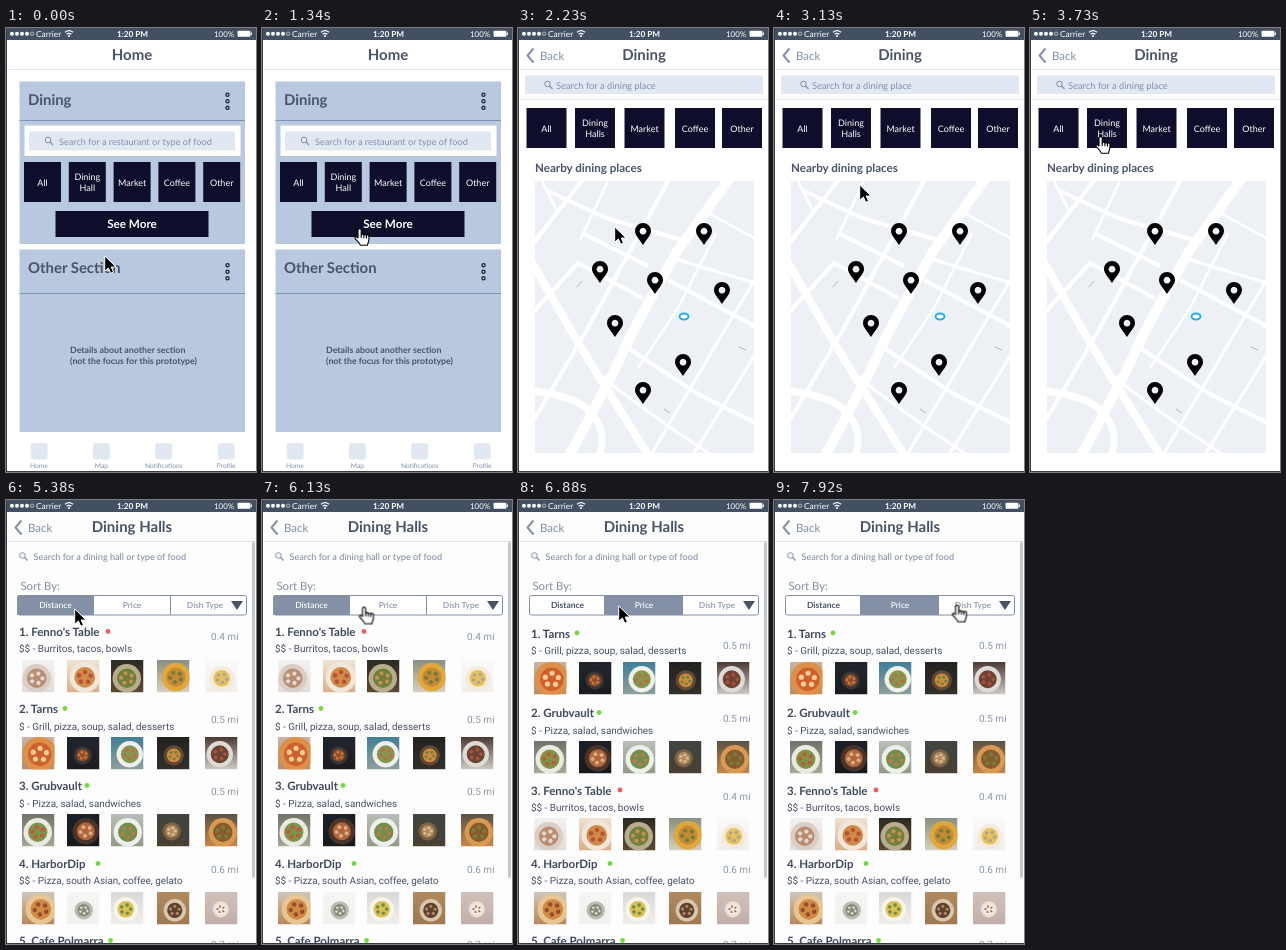
Recreate the animation shown at these times as an HTML page. Size 250 px wide and 444 px high, loop 8 s.

```html
<!DOCTYPE html>
<html lang="en">
<head>
<meta charset="utf-8">
<title>Dining app prototype</title>
<style>
html, body { margin: 0; width: 100%; height: 100%; overflow: hidden; background: #fff; }
svg { display: block; }
text { font-family: Lato, sans-serif; text-rendering: geometricPrecision; white-space: pre; }
.rb { font-family: Roboto, sans-serif; }
.md { font-weight: 500; }
.b { font-weight: 700; }
.m { text-anchor: middle; }
#home, #map, #near, #price, #cursor, #arrow, #hand { animation: 8s step-end infinite; }
#home { animation-name: home; }
#map { animation-name: map; }
#near { animation-name: near; }
#price { animation-name: price; }
#cursor { animation-name: move; }
#arrow { animation-name: arrow; }
#hand { animation-name: hand; }
@keyframes home { 0% { visibility: visible } 27.875%, 100% { visibility: hidden } }
@keyframes map { 0% { visibility: hidden } 27.875% { visibility: visible } 56%, 100% { visibility: hidden } }
@keyframes near { 0% { visibility: hidden } 56% { visibility: visible } 86%, 100% { visibility: hidden } }
@keyframes price { 0% { visibility: hidden } 86%, 100% { visibility: visible } }
@keyframes arrow {
  0%, 27.875%, 56%, 86% { visibility: visible }
  14.875%, 44.75%, 74.75%, 97.125%, 100% { visibility: hidden }
}
@keyframes hand {
  0%, 27.875%, 56%, 86% { visibility: hidden }
  14.875%, 44.75%, 74.75%, 97.125%, 100% { visibility: visible }
}
@keyframes move {
  0% { transform: translate(98px, 227px) }
  1.875% { transform: translate(97px, 226px) }
  13.125% { transform: translate(97px, 221px) }
  14.875% { transform: translate(92px, 204px) }
  16.75% { transform: translate(92px, 200px) }
  27.875% { transform: translate(96px, 198px) }
  37.25% { transform: translate(89px, 188px) }
  39.125% { transform: translate(85px, 156px) }
  41% { transform: translate(81px, 136px) }
  42.875% { transform: translate(72px, 120px) }
  44.75% { transform: translate(66px, 115px) }
  46.625% { transform: translate(65px, 108px) }
  56% { transform: translate(69px, 106px) }
  67.25% { transform: translate(68px, 108px) }
  69.125% { transform: translate(76px, 112px) }
  74.75% { transform: translate(92.5px, 107.5px) }
  76.625% { transform: translate(96.5px, 106.5px) }
  86% { transform: translate(100px, 105px) }
  93.5% { transform: translate(118px, 105px) }
  95.25% { transform: translate(155px, 102px) }
  97.125% { transform: translate(176.5px, 104.5px) }
  99%, 100% { transform: translate(177.5px, 104.5px) }
}
</style>
</head>
<body>
<svg width="250" height="444" viewBox="0 0 250 444">
  <rect width="250" height="444" fill="#fff"/>
  <g id="home"></g>
  <g id="map"></g>
  <g id="near"></g>
  <g id="price"></g>
  <g id="status"></g>
  <g id="cursor">
    <path id="arrow" d="M.7 .9V16.2L4.4 13 6.8 18.3 9.5 17.1 7.2 12H12z" fill="#000" stroke="#fff" stroke-width="1" stroke-linejoin="round"/>
    <g id="hand" stroke="#000" stroke-width="1.1" stroke-linejoin="round" stroke-linecap="round">
      <path fill="#fff" d="M4 10V2.2a1.6 1.6 0 0 1 3.2 0V7a1.4 1.4 0 0 1 2.7 .3 1.4 1.4 0 0 1 2.5 .5 1.3 1.3 0 0 1 2.5 .8v3.2c0 2-1.2 2.8-1.4 5.4H6.2C5.8 15 3 13 1.2 10.6 .4 9.2 2 8.3 3 9.2z"/>
      <path fill="none" d="M7.2 7V9.5M9.9 7.5V9.8M12.4 8V10"/>
    </g>
  </g>
</svg>
<script>
const SLATE = '#4a5468', BLUE = '#b8c8de', PALE = '#e1e8f2', NAVY = '#0e0e2c', STEEL = '#8090ad', GREY = '#8390a5';

const put = (id, parts) => { document.getElementById(id).innerHTML = parts.flat(9).join(''); };
const text = (x, y, size, str, fill, cls = '') =>
  `<text x="${x}" y="${y}" font-size="${size}" fill="${fill}" class="${cls}">${str}</text>`;
const rect = (x, y, w, h, fill, extra = '') =>
  `<rect x="${x}" y="${y}" width="${w}" height="${h}" fill="${fill}" ${extra}/>`;
const circle = (x, y, r, fill, extra = '') =>
  `<circle cx="${x}" cy="${y}" r="${r}" fill="${fill}" ${extra}/>`;
const path = (d, stroke, width, fill = 'none') =>
  `<path d="${d}" fill="${fill}" stroke="${stroke}" stroke-width="${width}"/>`;

const lens = (x, y) => circle(x, y, 2.8, 'none', `stroke="${STEEL}"`) +
  path(`M${x + 2} ${y + 2}l3 3`, STEEL, 1.3);
const title = str => text(126, 32.4, 15, str, SLATE, 'b m') + rect(1, 41, 249, 1, '#e2e6ec');
const back = color => path('M15.5 20.5L9.5 27.5 15.5 34.5', color, 2) + text(22, 31.5, 11.5, 'Back', color);

function button(cx, y, w, h, label) {
  const lines = label.split(' ');
  const top = y + h / 2 + (lines.length > 1 ? -2.5 : 3.5);
  return rect(cx - w / 2, y, w, h, NAVY) +
    lines.map((s, i) => text(cx, top + i * 11, 9, s, '#fff', 'm')).join('');
}

/* status bar and window edge */
put('status', [
  rect(0, 0, 250, 12, '#435063'),
  [6, 11, 16, 21].map(x => circle(x, 5.7, 2, '#fff')),
  circle(26, 5.7, 1.7, 'none', 'stroke="#fff" stroke-width=".6"'),
  text(30, 8.6, 8.4, 'Carrier', '#fff'),
  path('M59 4.3Q63 1.1 67 4.3M60.6 6.3Q63 4.3 65.4 6.3', '#fff', 1.2),
  circle(63, 8.1, 1, '#fff'),
  text(126.5, 8.6, 8.2, '1:20 PM', '#fff', 'b m'),
  text(208, 8.6, 7.9, '100%', '#fff'),
  rect(231.5, 2.7, 13, 6, '#fff', 'rx="1"'),
  rect(245, 4.5, 1, 2.4, '#fff'),
  rect(0, 0, 1, 444, '#3a3a40'),
  rect(0, 443, 250, 1, '#3a3a40')
]);

/* home */
const card = (y, h, head, name) => [
  rect(13.5, y, 225.5, h, BLUE),
  text(22, y + 23, 14.9, name, SLATE, 'b'),
  rect(13.5, y + head, 225.5, 1, '#7f93b8'),
  [-6.5, 0, 6.5].map(d => circle(221.5, y + head / 2 + .5 + d, 1.6, 'none', 'stroke="#20242e" stroke-width="1.3"'))
];
put('home', [
  title('Home'),
  card(53.5, 162.5, 38.5, 'Dining'),
  rect(18.5, 97.5, 216, 30.5, '#fff'),
  rect(23, 103.5, 206, 19, PALE),
  lens(42, 112),
  text(53, 116.5, 9.15, 'Search for a restaurant or type of food', STEEL),
  ['All', 'Dining Hall', 'Market', 'Coffee', 'Other'].map((s, i) => button(36.5 + i * 44.8, 134, 37, 40, s)),
  rect(49.5, 183, 153, 26, NAVY),
  text(126, 200, 11.7, 'See More', '#fff', 'b m'),
  card(221.5, 182.5, 43.5, 'Other Section'),
  text(64, 325, 8.8, 'Details about another section', SLATE, 'b'),
  text(64, 336, 8.8, '(not the focus for this prototype)', SLATE, 'b'),
  ['Home', 'Map', 'Notifications', 'Profile'].map((s, i) => {
    const cx = 33 + i * 62.4;
    return rect(cx - 8.5, 415, 17, 16.5, PALE, 'rx="3"') + text(cx, 439.5, 6.7, s, STEEL, 'm');
  })
]);

/* map */
const pin = (x, y) => `<path transform="translate(${x} ${y})" fill="#000" fill-rule="evenodd"
  d="M0 0C-3-5-8-9.5-8-14A8 8 0 0 1 8-14C8-9.5 3-5 0 0zM0-17.2a3.4 3.4 0 1 0 .01 0z"/>`;
const roads = [
  ['M50 430Q92 352 106 322T160 222L212 150', 10],
  ['M10 228L62 318 132 430', 8],
  ['M10 362Q62 368 76 388T80 430', 7],
  ['M10 402L70 300 150 153M10 222L66 150M10 290L60 235 124 270', 4],
  ['M28 162L88 190 170 214M66 206L130 238M150 252L240 300M110 320L180 366 240 396', 4],
  ['M134 425L196 320 240 246M176 425L240 322M160 232L240 256M84 350L150 398 190 425', 3],
  ['M120 340L160 280 198 205M190 185L240 212M40 185L24 153M90 153L62 212', 2.5]
];
put('map', [
  back(STEEL), title('Dining'),
  rect(7, 47.5, 238, 18.5, PALE),
  lens(29.5, 56),
  text(38, 60.5, 9.35, 'Search for a dining place', STEEL),
  rect(1, 71, 249, 1, '#e2e6ec'),
  ['All', 'Dining Halls', 'Market', 'Coffee', 'Other'].map((s, i) => button([28.5, 77, 126.5, 177, 224][i], 80, 40, 40, s)),
  text(17, 144, 11.6, 'Nearby dining places', SLATE, 'b'),
  '<svg x="17" y="153" width="219" height="272" viewBox="17 153 219 272">',
  rect(17, 153, 219, 272, '#edf1f6'),
  roads.map(([d, w]) => path(d, '#fff', w)),
  path('M59 259l5-6M221 319l7 3M146 381l6 4', '#aeb6c2', 1),
  '</svg>',
  [[125, 217], [186, 217], [82, 255], [137, 266], [204, 276], [97, 309], [165, 348], [125, 376]].map(p => pin(...p)),
  '<ellipse cx="166" cy="288.5" rx="4.4" ry="2.9" fill="#fff" stroke="#22aef0" stroke-width="2"/>'
]);

/* dining halls: each photo is dish radius, backdrop top and bottom, dish, food, garnish */
const halls = [
  { name: "Fenno's Table", dot: '#ff5a52', dotX: 102, far: '0.4', menu: '$$ - Burritos, tacos, bowls',
    pics: '14 f4f1ef e2dcd8 d9cdc6 b98d74 e8d9cc|15 efe2d4 d9b08a f0e6da d08a4c b5552c|14 2c2a22 5a4a34 b9ac8c 6f7f3c c98f52|14 8a8f80 d9cfc0 e0a83c c98a34 6f7f3c|12 fbfaf9 f2eeea f3ead8 e6c25c b3a294' },
  { name: 'Tarns', dot: '#6fdc3c', dotX: 59, far: '0.5', menu: '$ - Grill, pizza, soup, salad, desserts',
    pics: '17 c9b5a4 b98a66 dc9048 cf6030 f3cf96|9 22252c 1b1c20 3a3634 8a4e2c d07a34|13 3f7f96 8fa09c f0efec 7c9a50 c46a44|10 23221f 33302c 5f4a34 d08a3a 6f7f44|13 4a3a32 cfcac4 dedad5 6a4334 a8503a' },
  { name: 'Grubvault', dot: '#6fdc3c', dotX: 81, far: '0.5', menu: '$ - Pizza, salad, sandwiches',
    pics: '14 6d746c a9a89c ece9e2 7f9448 c05a3a|13 1d2026 17191d 4a342a b0663a d8b080|14 b9bdb8 8f9a86 eeeeea 6f9048 b9785a|9 3f4640 4a3e32 7a6248 b58a58 d6c0a0|14 5a5044 c48a4c d69a52 8a5a2c 6f7f3c' },
  { name: 'HarborDip', dot: '#6fdc3c', dotX: 92, far: '0.6', menu: '$$ - Pizza, south Asian, coffee, gelato',
    pics: '15 cfc6bc b9875a e6c694 cf8a44 9a4c2c|9 f6f5f4 f1f0ee b9bab4 8a8a7c d9d6c6|12 d9dad6 efeeea f6f4ee dcc050 7a8a4c|11 b08a64 a07850 d9c6ac 5a4030 a88460|8 d0bfba c2aea8 e9dfd8 f4efe8 b07c64' }
];

function photo(x, y, spec, id, k) {
  const [radius, ...hex] = spec.split(' ');
  const [top, bottom, dish, food, trim] = hex.map(h => '#' + h);
  const r = +radius, cx = 14.5 + k * 3 % 5, cy = 18 - k % 2;
  const blobs = [0, 1.25, 2.5, 3.75, 5].map(a =>
    circle(cx + r * .4 * Math.cos(a + k), cy + r * .35 * Math.sin(a + k), r * .15, trim)).join('');
  return `<svg x="${x}" y="${y}" width="32.5" height="32.5" viewBox="0 0 32 32">
    <linearGradient id="${id}" x2="0" y2="1"><stop stop-color="${top}"/><stop offset="1" stop-color="${bottom}"/></linearGradient>
    ${rect(0, 0, 32, 32, `url(#${id})`)}${circle(cx, cy, r, dish)}${circle(cx, cy, r * .68, food)}${blobs}</svg>`;
}

function hall(tab, index, n, [headY, menuY, farY, picY]) {
  const h = halls[index];
  return [
    text(13, headY, 11.5, `${n}. ${h.name}`, '#3f495d', 'b'),
    circle(h.dotX, headY - 4.5, 2.4, h.dot),
    text(13, menuY, 9.92, h.menu, '#465064', 'rb'),
    text(205, farY, 10, h.far + ' mi', '#8d97a8', 'rb'),
    h.pics.split('|').map((p, k) => photo([16, 61, 105, 151, 199][k], picY, p, `sky${tab}${index}${k}`, k + index))
  ];
}

function hallScreen(tab, order, rows) {
  const tabs = [['Distance', 49.5, 11.5, 76], ['Price', 126, 86, 79]];
  return [
    rect(0, 0, 250, 444, '#fdfdfd'),
    back(GREY), title('Dining Halls'),
    lens(16.5, 55.5),
    text(27.5, 60, 9.1, 'Search for a dining hall or type of food', GREY, 'md'),
    text(14.5, 89.5, 11.3, 'Sort By:', GREY),
    rect(11.5, 95.5, 229, 19.5, '#fff', 'rx="2"'),
    rect(tabs[tab][2], 95.5, tabs[tab][3], 19.5, GREY),
    rect(11.5, 95.5, 229, 19.5, 'none', `rx="2" stroke="${GREY}"`),
    path('M87.5 95.5V115M164.5 95.5V115', GREY, 1),
    tabs.map(([s, x], i) => text(x, 108, 8.5, s, i === tab ? '#fff' : tab ? SLATE : GREY, i < tab ? 'b m' : 'md m')),
    text(199, 108, 8.4, 'Dish Type', GREY, 'md m'),
    path('M225 101H237L231 110z', 'none', 0, SLATE),
    order.map((h, i) => hall(tab, h, i + 1, rows[i])),
    text(13, 445, 11.5, '5. Cafe Polmarra', '#3f495d', 'b'),
    circle(104.5, 440.5, 2.4, '#6fdc3c'),
    text(205, 448, 10, '0.7 mi', '#8d97a8', 'rb'),
    rect(246, 42, 3, 336, '#c3c6cb', 'rx="1.5"')
  ];
}
const last = [368, 383.5, 372.5, 392];
put('near', hallScreen(0, [0, 1, 2, 3],
  [[136, 152, 140, 160], [213, 229.5, 223, 237], [290, 306.5, 295, 314], last]));
put('price', hallScreen(1, [1, 2, 0, 3],
  [[137.5, 154, 149, 162], [217, 234, 222, 241], [294.5, 311, 300, 318], last]));
</script>
</body>
</html>
```
